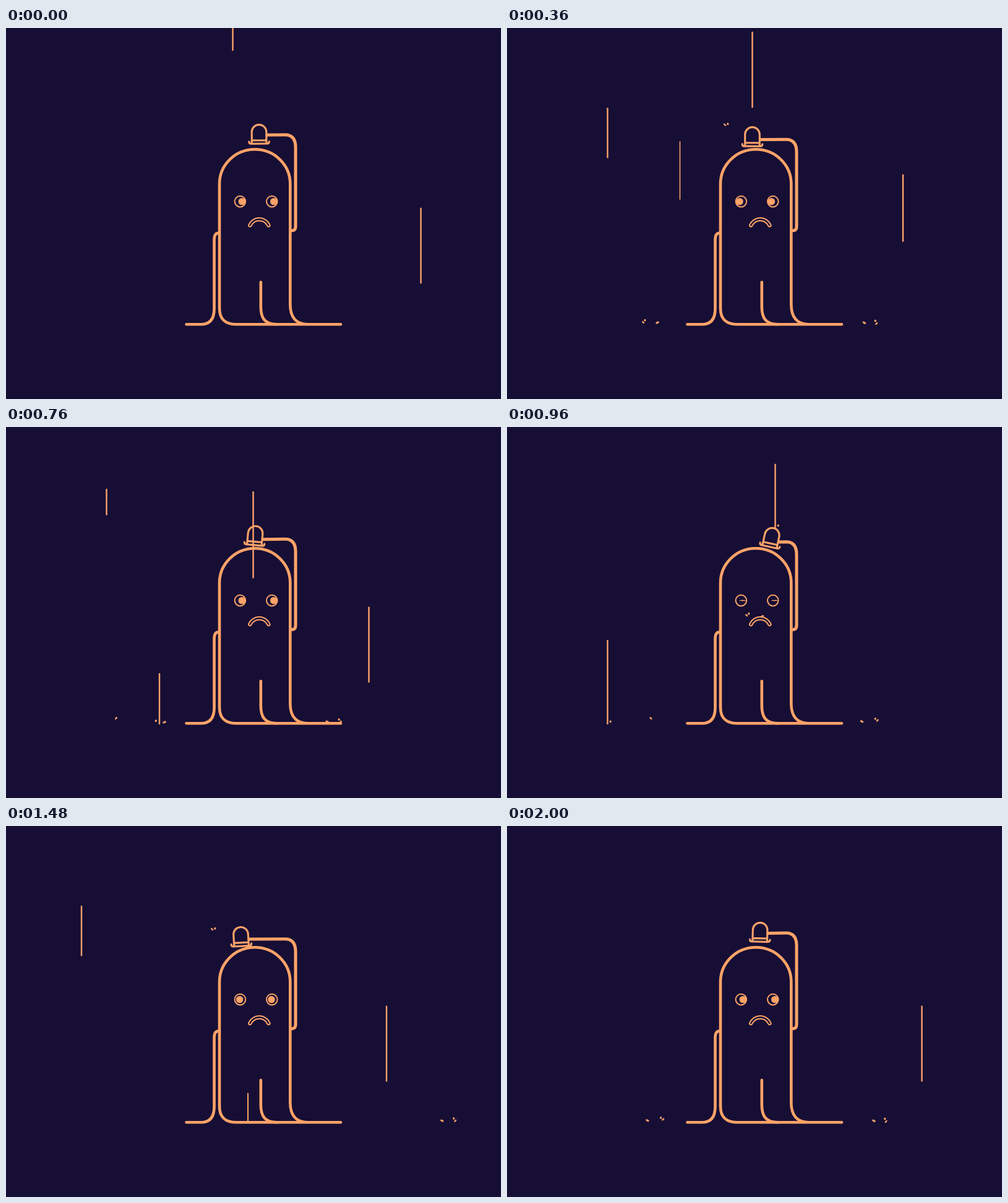
Recreate the animation shown at these times as an HTML page. Size 800 by 600 pixels, loop 2.04 s.

```html
<!DOCTYPE html>
<html lang="en">
<head>
<meta charset="utf-8">
<title>Rain</title>
<style>
  html, body { margin: 0; width: 100%; height: 100%; overflow: hidden; background: #170e35; }
  svg { display: block; width: 100vw; height: 100vh; }
  path, line, circle { fill: none; stroke: #ffa368; stroke-linecap: round; stroke-linejoin: round; }
  .body path { stroke-width: 4.6; }
  .body #arm { stroke-width: 5; }
  .hat path { stroke-width: 3.1; }
  .eye circle { stroke-width: 2; }
  ellipse { fill: #ffa368; }
</style>
</head>
<body>
<svg viewBox="0 0 800 600">
  <g class="body">
    <path d="M291.5 479.3H315C330 479.3 336.5 470 336.5 454V342Q336.5 331.5 344 331.5"/>
    <path d="M541 479.3H373C354 479.3 345 471 345 453V252A57.15 55.8 0 0 1 459.3 252V447C459.3 468 469 479.3 488 479.3"/>
    <path d="M411.8 411V451C411.8 470 419 479.3 438 479.3"/>
    <path id="arm"/>
  </g>
  <g id="hat" class="hat">
    <path d="M-11.8 14V-4A11.8 11.8 0 0 1 11.8 -4V14M-11.8 9.5H11.8"/>
    <path d="M-16.3 11.5Q-16.3 15 -13 15H13Q16.3 15 16.3 11.5"/>
  </g>
  <g class="eye"><circle cx="378.4" cy="280.6" r="8.8"/><ellipse cy="280.6" rx="5.7"/></g>
  <g class="eye"><circle cx="429.8" cy="280.6" r="8.8"/><ellipse cy="280.6" rx="5.7"/></g>
  <path d="M394.3 319A16.5 16.5 0 0 1 424.3 319" stroke-width="6.6"/>
  <path d="M394.3 319A16.5 16.5 0 0 1 424.3 319" style="stroke:#170e35" stroke-width="2.6"/>
  <g id="rain"></g>
</svg>
<script>
const LOOP = 2040, STEP = 40, LAST = 50;
const SKY = 101, GROUND = 480, FALL = 5;
const $ = id => document.getElementById(id);
const clamp = v => Math.max(0, Math.min(1, v));
const mix = (a, b, p) => a + (b - a) * p;

// Eases between [frame, value] stops.
function ease(stops, frame) {
  const next = stops.findIndex(([at]) => at > frame);
  if (next < 1) return stops[next ? stops.length - 1 : 0][1];
  const [[from, a], [to, b]] = stops.slice(next - 1, next + 1);
  const p = (frame - from) / (to - from);
  return mix(a, b, p * p * (3 - 2 * p));
}

const hatX = frame => ease([[0, 409], [4, 369], [9, 396.5], [17, 396.5],
  [24, 427.5], [32, 352], [41, 399.5], [LAST, 409]], frame);
const look = frame => ease([[4, 2.9], [8, -2.4], [13, -2.4], [18, 2.8],
  [25, 2.8], [30, -.8], [43, -.8], [48, 2.9]], frame);
const eyeHeight = frame => 5.7 * Math.max(.14, clamp(Math.abs(frame - 24) / 3));

// The hat follows the head's curve, leans with its speed and is lifted around the loop's seam.
function hatPose(frame) {
  const x = hatX(frame), off = x - 402;
  const speed = hatX(frame + .5) - hatX(frame - .5);
  const lift = Math.max(0, Math.cos(2 * Math.PI * frame / LAST)) ** 4;
  const tilt = .5 * off * (1 - Math.exp(-((off / 10) ** 2))) + speed;
  const y = 176 + .0055 * (x - 404) ** 2 - 4 * lift;
  const armY = y + 12 * Math.sin(tilt * Math.PI / 180) + 4.5 - 3.5 * lift;
  return { x, y, tilt, armY };
}

const fall = (x, start, options) =>
  ({ x, start, top: SKY, end: GROUND, flip: 1, width: 2.4, ...options });

// A drop that lands on the hat.
function caught(x, landing, height) {
  const end = hatPose(landing).y - 16;
  return fall(x, landing - FALL, { top: end - height, end, flip: x < 400 ? -1 : 1 });
}

const left = [[231, .6], [162.5, 8], [248, 13], [162.5, 19], [122, 36], [240, 41]];
const right = [[670.5, -4], [588, 1.45], [640, 6], [530.5, 11], [586.5, 15],
  [716, 29], [615, 33], [603.5, 42.45], [670.5, 46]];
const thin = [[279.5, 7], [690, 11], [119.5, 29]];

const drops = [
  ...left.map(([x, start], i) => fall(x, start, { flip: i % 2 ? 1 : -1 })),
  ...right.map(([x, start]) => fall(x, start)),
  ...thin.map(([x, start]) => fall(x, start, { flip: 0, width: 1.6 })),
  caught(366.5, 4, 180), caught(396.5, 9.5, 360), caught(433.5, 24, 288),
  caught(347.5, 32, 288), caught(397.5, 41, 237),
  fall(399.5, 15, { top: -113, end: 321, splashY: 310, flip: -1 }),
  fall(391, 32, { top: 346, flip: 0, width: 2 })
];

const stroke = (x1, y1, x2, y2, width) =>
  `<line x1="${x1}" y1="${y1}" x2="${x2}" y2="${y2}" stroke-width="${width}"/>`;

// Three specks fly outwards: a flat blob on one side, a dot and a late streak on the other.
function splash({ x, end, splashY = end, flip }, age) {
  const speck = (dx, dy, halfX, halfY, width) => stroke(
    x + flip * (dx - halfX), splashY + dy - halfY,
    x + flip * (dx + halfX), splashY + dy + halfY, width);
  const late = clamp((age - 7.5) / 3);
  let out = "";
  if (age > 5.5 && age < 9.8) out += speck(2 - 1.67 * age, -.4 * age - .2, 1.2, .6, 3);
  if (age >= 5 && age < 10.5) out += speck(age - .3, 1.8 - 1.1 * age, .1, .2, 3.2);
  if (age >= 7.5 && age < 11.6) out += speck(mix(9, 15.5, late), mix(-2, -9, late), .9, -.9, 2.4);
  return out;
}

function drawDrop(drop, frame) {
  const { x, start, top, end, flip, width } = drop;
  const age = frame - start;
  const head = clamp((age + .6) / 5.6), tail = clamp((age - .46) / 7.04);
  const line = head > tail ? stroke(x, mix(top, end, tail), x, mix(top, end, head), width) : "";
  return flip ? line + splash(drop, age) : line;
}

function draw(frame) {
  const { x, y, tilt, armY } = hatPose(frame);
  $("hat").setAttribute("transform", `translate(${x} ${y}) rotate(${tilt})`);
  $("arm").setAttribute("d",
    `M${x + 13} ${armY}L451 ${armY - .4}Q468 ${armY - .4} 468 ${armY + 20}V321Q468 327.7 462 327.7`);

  document.querySelectorAll(".eye").forEach(({ children: [ring, pupil] }) => {
    pupil.setAttribute("cx", +ring.getAttribute("cx") + look(frame));
    pupil.setAttribute("ry", eyeHeight(frame));
  });

  $("rain").innerHTML = drops.map(drop => drawDrop(drop, frame)).join("");
}

const began = performance.now();
function tick() {
  draw(Math.floor((performance.now() - began) % LOOP / STEP));
  requestAnimationFrame(tick);
}
tick();
</script>
</body>
</html>
```
